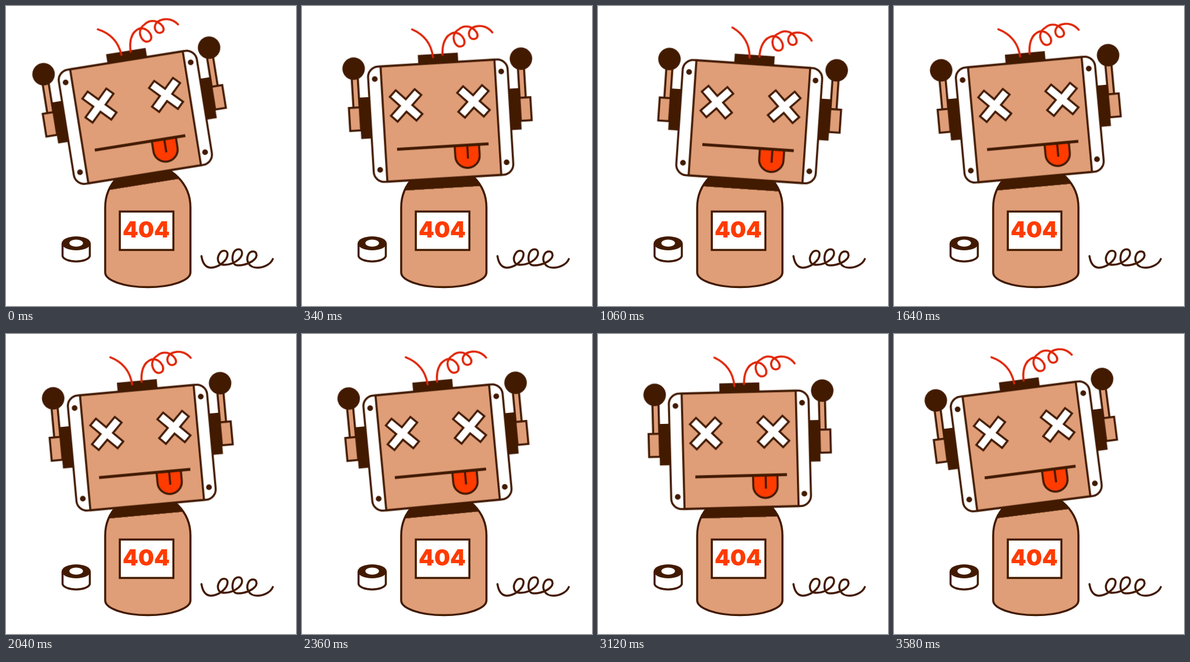
An HTML page for the animation above (3.6 s loop, 500 by 517 pixels).

```html
<!DOCTYPE html>
<html lang="en">
<head>
<meta charset="utf-8">
<title>404 robot</title>
<style>
  html, body { margin: 0; width: 100%; height: 100%; overflow: hidden; background: #fff; }
  svg { display: block; width: 500px; height: 517px; }

  .line { fill: none; stroke: #421a00; stroke-width: 3.5; }
  .dark { fill: #421a00; }
  .tan { fill: #df9e78; }
  .white { fill: #fff; }
  .red { fill: #ff3b00; }
  .wire { fill: none; stroke: #e02200; stroke-width: 3.5; stroke-linecap: round; }
  .label { font: 900 38.5px Inter, "Open Sans", sans-serif; text-anchor: middle; }

  /* The head rocks from shoulder to shoulder; its local origin is its centre. */
  .rock { transform-origin: 0 0; animation: rock 400ms linear infinite; }
  @keyframes rock {
    0%, 100% { transform: translate(222.75px, 191.75px) rotate(-9.2deg); }
    25%, 75% { transform: translate(250.5px, 201.7px) rotate(.6deg); }
    50% { transform: translate(276.75px, 195.6px) rotate(9deg); }
  }
</style>
</head>
<body>
<svg viewBox="0 0 500 517">
  <defs>
    <path id="torso" d="M171 347A73.5 73.5 0 0 1 318 347V459A73.5 25.5 0 0 1 171 459Z"/>
    <clipPath id="inTorso"><use href="#torso"/></clipPath>

    <g id="ear">
      <rect class="dark" x="-138.5" y="-48" width="20" height="71.5"/>
      <rect class="line tan" x="-148.8" y="-90" width="10.5" height="62"/>
      <rect class="line tan" x="-156.7" y="-31.2" width="18.8" height="39.7"/>
      <circle class="dark" cx="-144.5" cy="-98.4" r="19.4"/>
    </g>

    <path id="eye" class="line white" transform="rotate(45)"
      d="M-30.7-7.6h23.1v-23.1h15.2v23.1h23.1v15.2h-23.1v23.1h-15.2v-23.1h-23.1z"/>

    <g id="screws" class="dark">
      <circle cx="-109.2" cy="-78.4" r="4.9"/>
      <circle cx="-109.2" cy="78.4" r="4.9"/>
    </g>
  </defs>

  <!-- body -->
  <use href="#torso" class="tan"/>
  <g clip-path="url(#inTorso)">
    <rect class="rock dark" x="-140" y="84" width="280" height="32.5"/>
  </g>
  <use href="#torso" class="line"/>
  <rect class="line white" x="196.2" y="354.2" width="92.4" height="66.2"/>
  <text class="label red" x="241.7" y="398.8">404</text>

  <!-- tape roll -->
  <path class="line white" d="M97.5 409V431A23.7 10.5 0 0 0 144.5 431V409"/>
  <ellipse class="dark" cx="121" cy="409" rx="25" ry="12"/>
  <ellipse class="white" cx="121" cy="408.6" rx="11.7" ry="6.2"/>

  <!-- spring -->
  <path class="line" stroke-linecap="round"
    d="M337 431C339 444 345 451 354 451C368 450 382 438 382 428C382 420 372 420 368 427
       C363 435 365 445 374 446C390 447 407 436 407 426C407 417 396 417 392 426
       C389 435 390 447 400 447C414 447 431 439 432 430C432 421 422 421 418 428
       C413 438 418 451 433 451C446 451 457 444 460 436"/>

  <!-- head -->
  <g class="rock">
    <use href="#ear"/>
    <use href="#ear" transform="scale(-1 1)"/>
    <rect class="dark" x="-32.7" y="-115.3" width="69" height="18"/>
    <path class="wire" d="M-40-160C-18-149-8-131-6.7-110"/>
    <path class="wire"
      d="M10-113C10-127 14-146 31-150C48-151 56-126 41.5-125.5C31-125 24-148 41-155.5
         C44-158 49-160 54-159.5C68-159 80-139 66-137C56-136 52-155 70-158.5C82-161 92-155 98-146.5"/>

    <rect class="white" x="-120.5" y="-99.5" width="241" height="199" rx="18"/>
    <rect class="line tan" x="-98" y="-99.5" width="196.7" height="199"/>
    <rect class="line" x="-120.5" y="-99.5" width="241" height="199" rx="18"/>
    <use href="#screws"/>
    <use href="#screws" transform="scale(-1 1)"/>

    <use href="#eye" x="-57.9" y="-29.8"/>
    <use href="#eye" x="58.4" y="-29.8"/>
    <path class="line red" d="M21.5 45V63A21 21 0 0 0 63.5 63V45Z"/>
    <path class="line" d="M43.2 45V68"/>
    <path class="line" style="stroke-width:5" d="M-78 44.8H80"/>
  </g>
</svg>
</body>
</html>
```
